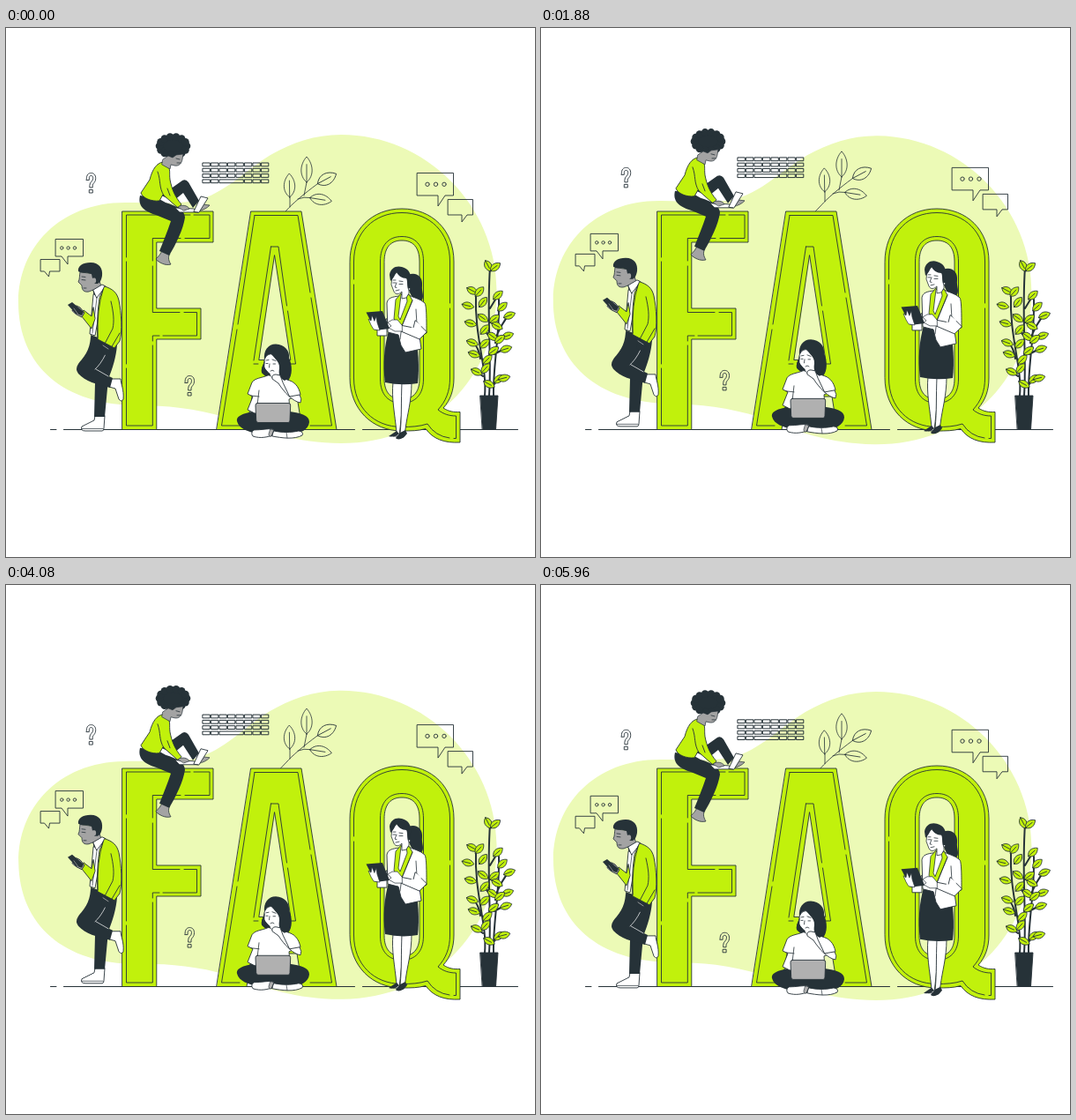
These frames come from a looping animation (600x600 px, 6000 ms). An HTML page with a canvas:

```html
<!DOCTYPE html>
<html lang="en">
<head>
<meta charset="utf-8">
<title>FAQ</title>
<style>
html, body { margin: 0; width: 100%; height: 100%; overflow: hidden; background: #fff; }
canvas { display: block; width: 600px; height: 600px; }
</style>
</head>
<body>
<canvas id="stage"></canvas>
<script>
const canvas = document.getElementById('stage');
const ctx = canvas.getContext('2d');
const dpr = window.devicePixelRatio || 1;
canvas.width = canvas.height = 600 * dpr;

const LIME = '#c1f10c', PALE = '#ecfab6', DARK = '#263238', SKIN = '#a3a3a3', GREY = '#b0b0b0', WHITE = '#fff';
const LOOP = 6000, LIFT = 8.2;

const cache = {};
const path = d => cache[d] || (cache[d] = new Path2D(d));

function shape(d, fill, stroke = DARK, width = 0.9) {
  if (fill) {
    ctx.fillStyle = fill;
    ctx.fill(path(d), 'evenodd');
  }
  if (stroke) {
    ctx.strokeStyle = stroke;
    ctx.lineWidth = width;
    ctx.stroke(path(d));
  }
}
const line = (d, width = 0.9, color = DARK) => shape(d, null, color, width);
const solid = (d, color = DARK) => shape(d, color, null);

function at(dx, dy, draw) {
  ctx.save();
  ctx.translate(dx, dy);
  draw();
  ctx.restore();
}

function dot(x, y, r, fill, stroke) {
  ctx.beginPath();
  ctx.arc(x, y, r, 0, 7);
  if (fill) { ctx.fillStyle = fill; ctx.fill(); }
  if (stroke) { ctx.strokeStyle = stroke; ctx.lineWidth = 0.9; ctx.stroke(); }
}

function leaf(x, y, deg, len, wide, fill) {
  ctx.save();
  ctx.translate(x, y);
  ctx.rotate(deg * Math.PI / 180);
  const h = len / 2;
  ctx.beginPath();
  ctx.moveTo(-h, 0);
  ctx.bezierCurveTo(-h * 0.5, -wide * 0.7, h * 0.4, -wide * 0.62, h, 0);
  ctx.bezierCurveTo(h * 0.4, wide * 0.62, -h * 0.5, wide * 0.7, -h, 0);
  if (fill) { ctx.fillStyle = fill; ctx.fill(); }
  ctx.moveTo(-h, 0);
  ctx.lineTo(h * 0.4, 0);
  ctx.strokeStyle = DARK;
  ctx.lineWidth = 0.8;
  ctx.stroke();
  ctx.restore();
}

function blob(deg) {
  ctx.save();
  ctx.translate(285.5, 296);
  ctx.rotate(deg * Math.PI / 180);
  ctx.translate(-285.5, -296);
  solid('M14 311C14 250 60 198 135 198C165 198 190 200 215 196C250 187 270 162 300 144C325 130 350 121 380 121C476 121 556.5 201 556.5 298C556.5 400 480 471 380 471C330 471 290 457 250 442C215 431 180 428 150 428C65 428 14 383 14 311Z', PALE);
  ctx.restore();
}

function sprig() {
  line('M296 230L318 207C324 200 338 188 353 177M322 203V192M338 190L341 175M331 194Q338 191 345 192.5', 0.8);
  leaf(321.5, 178.5, -91, 27, 12.5);
  leaf(341, 160.5, -90, 29, 12.5);
  leaf(364, 171, -28, 24, 13);
  leaf(357, 194.5, 9, 25, 12);
}

function letters() {
  shape('M132 208H235V243H170.8V318H221V353H170.8V455.5H132Z', LIME);
  line('M166.3 360V451H136.5V386M136.5 381V265M136.5 260V212H209M213 212H231V238.5H203M198 238.5H166.3V264M166.3 270V322.5H197M202 322.5H216.5V349H178M174 349H166.3V355');

  shape('M278 208H335L375 455.5H336L330 418H279L273 455.5H239ZM304.6 258L322.8 376.5H287.2Z', LIME);
  line('M282 212.5H331L345 300M346 306L369.5 451H345M265 451H244.5L262 342M263 336L282 212.5M300.5 248H309L318.5 315M319.5 321L328.5 381H315M281 381H286M281 377L300.5 248');

  shape('M390 265C390 229 415 205 449 205C483 205 508 229 508 265V397C508 411 504 422 496 431C502 435 508 436 515 435.5V470C497 471 484 466 476 454.5C468 457 459 457 449 457C415 457 390 432 390 397ZM429 265C429 248 437 241 449 241C461 241 469 248 469 265V398C469 414 461 421 449 421C437 421 429 414 429 398Z', LIME);
  line('M394.5 285V265C394.5 232 417 209.5 449 209.5C481 209.5 503.5 232 503.5 265V312M503.5 318V397C503.5 412 499 423 490 433C496 438 503 440 510.5 440V465.5H508M503 465Q487 463 478 449C469 452 459 452.5 449 452.5C417 452.5 394.5 430 394.5 397V291M424.5 330V265C424.5 246 434 236.5 449 236.5C464 236.5 473.5 246 473.5 265V398C473.5 416 464 425.5 449 425.5C434 425.5 424.5 416 424.5 398V336');
}

const LEAVES = [
  [547, 270, 62], [555, 271, -38], [529, 298, 28], [537, 299, -48], [558, 303, -42],
  [524, 315, 14], [541, 311, -52], [563, 316, -42], [571, 326, -22], [527, 335, 16],
  [541, 329, 35], [554, 330, -38], [543, 342, -48], [557, 338, 28], [569, 349, -20],
  [529, 357, 20], [552, 350, 36], [543, 358, -42], [560, 353, -38], [567, 364, -18],
  [531, 370, 18], [546, 376, -44], [553, 366, -36], [534, 390, 24], [544, 386, -48],
  [548, 404, 28], [559, 398, -38], [565, 397, -15]
];
function plant() {
  line('M548 417C551 370 545 330 549 271M543 417C546 385 531 350 533 302M553 417C552 385 560 350 559 308M538 375Q536 362 530 357M556 350Q563 334 570 326M554 370Q560 366 567 364M553 405Q558 398 564 397M541 395L534 390M548 350L542 342M549 318L558 303', 2);
  LEAVES.forEach(([x, y, a]) => leaf(x, y, a, 14, 8, LIME));
  shape('M538 417H558L555.5 455.5H540.5Z', DARK);
}

const MARK = 'M-5.2 6.5C-5.2 2 -3 0 0 0C3.5 0 5.2 2.5 5.2 6C5.2 11 1.7 11.5 1.7 14.5V16.5H-1.6V14C-1.6 10 2.2 9.5 2.2 6C2.2 4 1.5 3 0 3C-1.5 3 -2.2 4 -2.2 6.5V8H-5.2ZM-1.8 19H1.8V22.5H-1.8Z';

function icons() {
  at(96.5, 164.5, () => line(MARK));
  at(208.3, 394.5, () => line(MARK));
  line('M466.5 164.5H507.5V190H498L490 202V190H466.5ZM501.5 194.5H529.5V212H523L517 220V212H501.5Z');
  [478, 487.5, 497].forEach(x => dot(x, 177.3, 2.2, null, DARK));
  line('M56.5 239.5H87.5V259H70V268L63 259H56.5ZM39.5 262.5H61V276H49.5L48.5 282L43.5 276H39.5Z');
  [63.3, 70.6, 78].forEach(x => dot(x, 249.5, 1.7, null, DARK));
  ctx.strokeStyle = DARK;
  ctx.lineWidth = 1;
  for (let row = 0; row < 4; row++) {
    for (let i = 0; i < 8; i++) {
      const y = 153 + row * 6.3, bar = row === 3 && i === 2;
      ctx.strokeRect(223.3 + i * 9.5, y, bar ? 27 : 8, 3.8);
      if (bar) i += 2;
    }
  }
}

function manWithPhone() {
  // shoes
  shape('M101 440L100 445L86 452Q84 457 90 457H109Q111 457 111 454L112 440Z', WHITE);
  line('M86 454.5H110', 0.7);
  shape('M119 398L130 398C130 403 134 410 133 421Q131 425 128 421L124 409L117 407Z', WHITE);
  // trousers
  solid('M96 348L126 359C125 373 121 386 116 398L112 441L100 441L101 403L99 385Z');
  solid('M96 350L116 368L102 386C107 390 114 394 121 397L118 408C103 404 90 401 82 392Q78 387 82 381C88 373 95 367 96 350Z');
  line('M101 387Q107 382 113 370M102 387L116 395', 0.7, WHITE);
  // shirt
  shape('M103 294L111 292L109 305L101 349L95 347L99 303Z', WHITE);
  line('M104 299L98 346', 0.7);
  // far arm
  shape('M99 317L97 327L88 320L85 326L97 341L101 330Z', LIME);
  // phone and hand
  shape('M80 315L84 317L89 323L86 328L80 325L75 321L77 318Z', SKIN);
  solid('M70 314L75 311L88 322L86 326L79 324Z');
  line('M74 320L78 324M77 318L82 325', 0.7, SKIN);
  // head
  shape('M84 277C83 281 84 284 82 288L84 290L86 292C86 297 88 300 94 299L99 297L100 303L108 293L105 284L98 279Z', SKIN, DARK, 0.8);
  line('M86 285.5L90 286M86 282L90 282.5M88 295L91 295', 0.8);
  solid('M82 276C81 270 87 266 96 266C106 266 110 273 109 281C108 287 106 289 104 290L100 290C102 286 101 283 98 284L97 279C92 277 87 279 82 276Z');
  solid('M98 284Q103 282 102 288Q101 291 98 289Z', SKIN);
  shape('M99 297L109 291L113 293L103 306Z', WHITE);
  // cardigan
  shape('M112 293C121 296 126 300 128 309C131 323 132 344 129 355L123 363L104 353C103 334 104 319 106 306Z', LIME);
  line('M119 310C122 323 123 332 121 341L111 360M129 346L119 363M110 297Q103 318 104 351');
  solid('M110 360L119 364L116 373L108 368Z');
  line('M110 360L116 364', 0.9, SKIN);
}

function afro(x, y) {
  ctx.fillStyle = DARK;
  ctx.beginPath();
  ctx.ellipse(x, y, 17.5, 13, 0, 0, 7);
  ctx.fill();
  for (let a = 0; a < 6.2; a += Math.PI / 7) dot(x + 15.5 * Math.cos(a), y + 10.5 * Math.sin(a), 4.3, DARK);
}

function womanOnLetter() {
  // far leg and foot
  solid('M176 190L200 173Q204 171 207 175L219 196L212 204L201 187L190 196Z');
  shape('M217 200L222 200L231 201Q227 206 217 208Z', SKIN, DARK, 0.7);
  // near leg
  shape('M177 252L186 256C183 260 185 265 187 268C181 270 173 266 170 262C173 259 176 256 177 252Z', SKIN, DARK, 0.8);
  solid('M152 190C149 202 157 208 170 212L187 219C183 231 178 243 174 253L185 258C193 245 201 228 203 215C203 207 194 202 181 198L172 193Z');
  // sweater
  shape('M178 152C171 153 166 160 163 172L153 187C155 193 165 197 174 196L178 189L195 204L199 200C192 192 188 183 186 172C185 164 187 160 183 155Z', LIME);
  line('M172 163C176 174 173 180 179 190M183 182L186 190');
  // head
  afro(189.5, 133.8);
  shape('M178 149L184 145L189 147L193 144L201 143L200 149C199 154 196 157 191 156L187 155L186 160L177 155Z', SKIN, DARK, 0.7);
  line('M193 148L197 149M194 153H198', 0.8);
  // laptop
  shape('M192 204L213 205L218 209H197Z', WHITE);
  shape('M195 203C199 200 206 201 208 205L202 207Z', SKIN, DARK, 0.7);
  shape('M213 208L221 191L229 193L219 209Z', WHITE);
}

function womanOnFloor() {
  solid('M284 434C271 437 261 439 262 446C264 455 276 458 284 460L300 463L322 460C334 460 343 456 344 447C344 439 334 437 322 435Z');
  shape('M281 456C290 456 297 454 303 455L305 461C297 464 289 466 280 463Q277 459 281 456Z', WHITE);
  shape('M300 455L304 456L301 463C299 464 298 462 298 461Z', GREY, DARK, 0.7);
  shape('M304 457C313 459 323 459 332 457Q338 458 336 462C327 467 313 465 302 463Z', WHITE);
  line('M318 459L319 465', 0.7);
  // hair behind the face
  solid('M293 376C292 366 297 358.5 306 358.5C316 359 322 366 321 374C325 383 325 394 320 400C311 404 296 398 290 391C289 384 293 382 293 376Z');
  // shirt and arms
  shape('M297 394C290 397 282 397 279 402L274 415L280 418L274 433L282 437H322L321 421L334 416C332 406 327 401 319 399L309 395Z', WHITE);
  line('M287 411L285 428M278 417L287 418', 0.8);
  // face and hair in front
  shape('M294 374C297 368 306 368 312 376L312 388L310 397C306 400 300 397 299 392L294 388C292 383 292 378 294 374Z', WHITE, DARK, 0.8);
  solid('M294 376C293 380 289 384 290 391L296 393L297 390L293 385ZM298 365C301 373 311 377 310 386C309 392 310 397 316 400C325 396 323 383 319 371L308 361Z');
  line('M295 377L298 376.5M302 376L306 377.5M295 380.5H297M303 381H305.5M299 381L298.5 385M300 389Q302 387 304 389', 0.8);
  shape('M322 418L333 416Q336 421 334 425C326 424 316 414 309 403L302 398Q301 393 306 393L311 394L314 402Z', WHITE);
  shape('M285 425.5H320Q323 425.5 322.7 428L322 445Q322 447.5 320 447.5H286Q284 447.5 283.7 445L283 428Q283 425.5 285 425.5Z', GREY);
}

function womanWithTablet() {
  // legs and shoes
  shape('M439 402C437 420 441 437 443 459L439 463L446 463L449 435L450 402Z', WHITE);
  shape('M449 402C448 425 449 440 447 460L446 465L451 464L453 455C455 438 460 424 460 402Z', WHITE);
  solid('M434 463L443 457L446 460Q441 465 434 463ZM442 465L447 459L453 456L455 460Q449 468 443 466Z');
  solid('M434 343H463C468 362 469 386 467 403Q448 406 430 402C427 382 429 362 434 343Z');
  // ponytail
  solid('M456 280C466 276 473 283 472 292C471 300 476 305 470 311C464 309 459 305 457 297Z');
  // jacket
  shape('M446 304C438 305 433 306 432 312L433 345L445 348L448 360L453 368L471 364L469 350L477 346C477 331 477 315 475 312C470 307 462 306 457 303Z', WHITE);
  shape('M448 301L442 308L440 330L449 338L461 309L457 302L452 307Z', LIME, DARK, 0.8);
  shape('M448 303L445 327L447 331L455 310L454 303Z', WHITE, DARK, 0.8);
  line('M461 309L449 338L447 353M465 319L466 336', 0.8);
  // head
  shape('M438 281L437 291L440 299C442 303 446 302 449 299L449 307L454 306L457 301L457 284L446 276Z', WHITE, DARK, 0.8);
  line('M439 289H442M446 290.5H450M439 286H442M446 287L450 287.5M443 289L441 294L443 294.5M442 298L446 297', 0.8);
  solid('M435 280C436 272 443 269 449 271C457 273 460 279 459 287L457 298C454 294 456 287 454 284C449 284 445 281 443 277C441 280 439 285 436 287Z');
  dot(457.5, 296, 0.8, WHITE);
  // arms and tablet
  shape('M432 330L432 349L421 349L421 339Z', WHITE);
  solid('M408.5 322.5L427 321L435 341L419 343Z');
  shape('M415 326L414 332L411 330L414 337L417 342L424 343L421 334L420 327L418 332Z', WHITE, DARK, 0.7);
  shape('M477 345L469 353L448 344L447 337L462 340L464 332Z', WHITE);
  solid('M465 333L463 340L460 339L459 342L469 345L471 337Z', WHITE);
  shape('M449 337L444 331L438 331L433 334L437 338L434 340L441 344L449 344Z', WHITE, DARK, 0.7);
}

// Triangle wave: 0 at the ends of a period, 1 in the middle.
const rise = (t, period) => 1 - Math.abs(2 * (t % period) / period - 1);

function sway(t) {
  const p = t / LOOP;
  return p < 0.25 ? p * 4 : p < 0.75 ? 2 - p * 4 : p * 4 - 4;
}

function render(t) {
  const slow = -LIFT * rise(t, LOOP), quick = -LIFT * rise(t, LOOP / 2);
  ctx.setTransform(dpr, 0, 0, dpr, 0, 0);
  ctx.lineJoin = ctx.lineCap = 'round';
  ctx.fillStyle = WHITE;
  ctx.fillRect(0, 0, 600, 600);
  blob(sway(t));
  line('M50.5 455.5H57M65.5 455.5H395.5M404.5 455.5H580.5', 1);
  at(0, quick, sprig);
  letters();
  plant();
  at(0, quick, icons);
  at(0, slow, manWithPhone);
  at(0, slow, womanOnLetter);
  at(0, slow, womanOnFloor);
  at(0, quick, womanWithTablet);
}

function frame(now) {
  render(now % LOOP);
  requestAnimationFrame(frame);
}
render(0);
requestAnimationFrame(frame);
</script>
</body>
</html>
```
